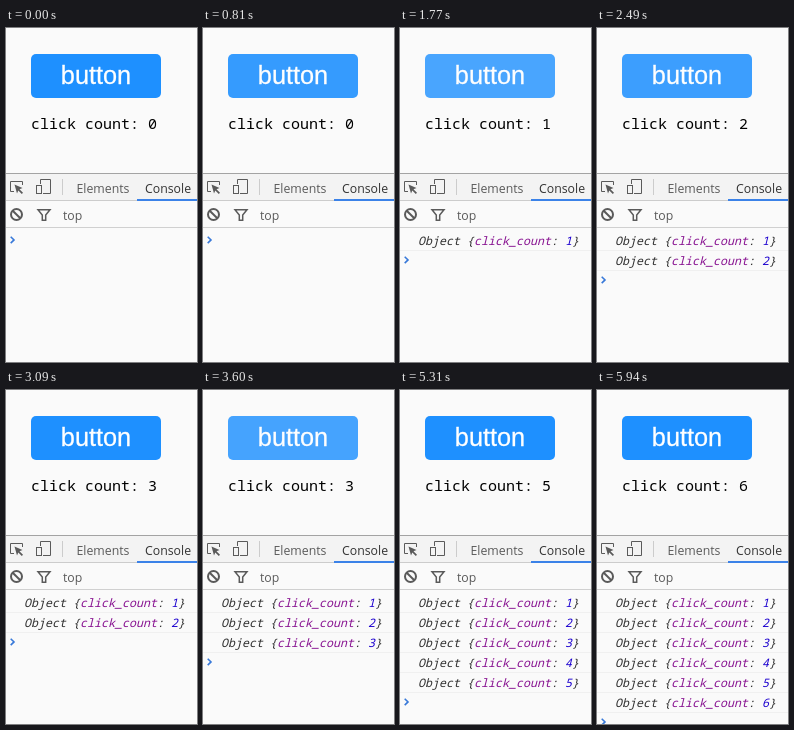
An HTML page that plays this animation: 191 by 334 pixels, repeating every 6900 ms.

```html
<!DOCTYPE html>
<html lang="en">
<head>
<meta charset="utf-8">
<title>Click counter</title>
<style>
  html, body { margin: 0; width: 100%; height: 100%; overflow: hidden; background: #fafafa; }
  svg { display: block; width: 191px; height: 334px; }
  text { white-space: pre; }
  .label { font: 25.3px "Liberation Sans", Arial, sans-serif; fill: #fff; stroke: #fff; stroke-width: .3; text-anchor: middle; }
  .count { font: 15px "Noto Sans Mono", monospace; fill: #000; }
  .ui { font: 12.3px "Open Sans", sans-serif; fill: #5a5a5a; }
  .log { font: italic 11.67px "Noto Sans Mono", monospace; fill: #303030; }
  .key { fill: #881391; }
  .num { fill: #1c00cf; }
  .icon { fill: none; stroke: #5a5a5a; }
  .solid { fill: #5a5a5a; }
</style>
</head>
<body>
<svg viewBox="0 0 191 334">
  <rect width="191" height="334" fill="#fafafa"/>
  <g id="button">
    <rect x="25" y="26" width="130" height="44" rx="5" fill="#1e90ff"/>
    <text class="label" x="90" y="56">button</text>
  </g>
  <text class="count" x="25" y="101">click count:</text>
  <g id="digits"></g>

  <rect y="145" width="191" height="27" fill="#f3f3f3"/>
  <rect y="145" width="191" height="1" fill="#a3a3a3"/>
  <rect y="172" width="191" height="1" fill="#ccc"/>
  <rect x="131" y="171" width="60" height="2" fill="#3b82e8"/>
  <rect y="199" width="191" height="1" fill="#d0d0d0"/>
  <rect x="56" y="151" width="1" height="16" fill="#ccc"/>

  <path class="icon" d="M8 163.5H4.500V153.500H16.500V157"/>
  <path class="solid" d="M8.500 156.500L16.500 160L13.500 161.300L17 164.800L15.800 166L12.300 162.500L11 165.500Z"/>
  <path class="icon" d="M34.500 156V151.500H44.500V165.500H37"/>
  <rect class="icon" x="30.500" y="157.500" width="5" height="8"/>
  <text class="ui" x="70.500" y="165">Elements</text>
  <text class="ui" x="139" y="165" style="fill:#333">Console</text>

  <g class="icon" stroke-width="2">
    <circle cx="10.500" cy="186.500" r="5.500"/>
    <path d="M6.700 182.700L14.300 190.300"/>
  </g>
  <path class="icon" stroke-width="1.5" d="M32 181.700H44L39.700 187V192.300H36.300V187Z"/>
  <text class="ui" x="57" y="192">top</text>

  <g id="logs"></g>
  <path id="prompt" d="M4.700 208.700L8 211.900L4.700 215.100" fill="none" stroke="#3879d9" stroke-width="1.6"/>
</svg>
<script>
const LOOP = 6900, FADE = 300, ROW = 20;
// [fade start, click, log line], in ms
const STEPS = [
  [720, 1170, 1170],
  [1510, 2040, 2070],
  [2370, 3090, 3120],
  [3420, 3930, 3960],
  [4335, 4950, 4980],
  [5335, 5910, 5940]
];
const $ = id => document.getElementById(id);
const at = (ms, props) => ({ offset: ms / LOOP, ...props });
const origin = document.timeline.currentTime || 0;

function play(el, frames) {
  el.animate(frames, { duration: LOOP, iterations: Infinity }).startTime = origin;
}

// Visible from one time until another, with hard changes
function show(el, from, to) {
  const key = (ms, opacity) => at(ms, { opacity, easing: 'step-end' });
  const frames = [key(from, 1), key(to, 0)];
  if (from > 0) frames.unshift(key(0, 0));
  if (to < LOOP) frames.push(key(LOOP, 0));
  play(el, frames);
}

function add(parent, html) {
  parent.insertAdjacentHTML('beforeend', html);
  return parent.lastElementChild;
}

for (let n = 0; n <= STEPS.length; n++) {
  const digit = add($('digits'), `<text class="count" x="142" y="101">${n}</text>`);
  show(digit, n ? STEPS[n - 1][1] : 0, n < STEPS.length ? STEPS[n][1] : LOOP);
}

const fade = [at(0, { opacity: 1 })];
const drop = [at(0, { transform: 'translateY(0px)' })];

STEPS.forEach(([start, click, log], i) => {
  const y = 217 + i * ROW;
  const line = add($('logs'), `<g>
    <rect y="${y + 5}" width="191" height="1" fill="#f0f0f0"/>
    <text class="log" x="18" y="${y}">Object {<tspan class="key">click_count</tspan>: <tspan class="num">${i + 1}</tspan>}</text>
  </g>`);
  show(line, log, LOOP);

  fade.push(
    at(start, { opacity: 1, easing: 'ease' }),
    at(start + FADE, { opacity: 0.8 }),
    at(click, { opacity: 0.8 }),
    at(click, { opacity: 1 })
  );
  drop.push(
    at(log, { transform: `translateY(${i * ROW}px)` }),
    at(log, { transform: `translateY(${(i + 1) * ROW}px)` })
  );
});

fade.push(at(LOOP, { opacity: 1 }));
drop.push(at(LOOP, { transform: `translateY(${STEPS.length * ROW}px)` }));
play($('button'), fade);
play($('prompt'), drop);
</script>
</body>
</html>
```
